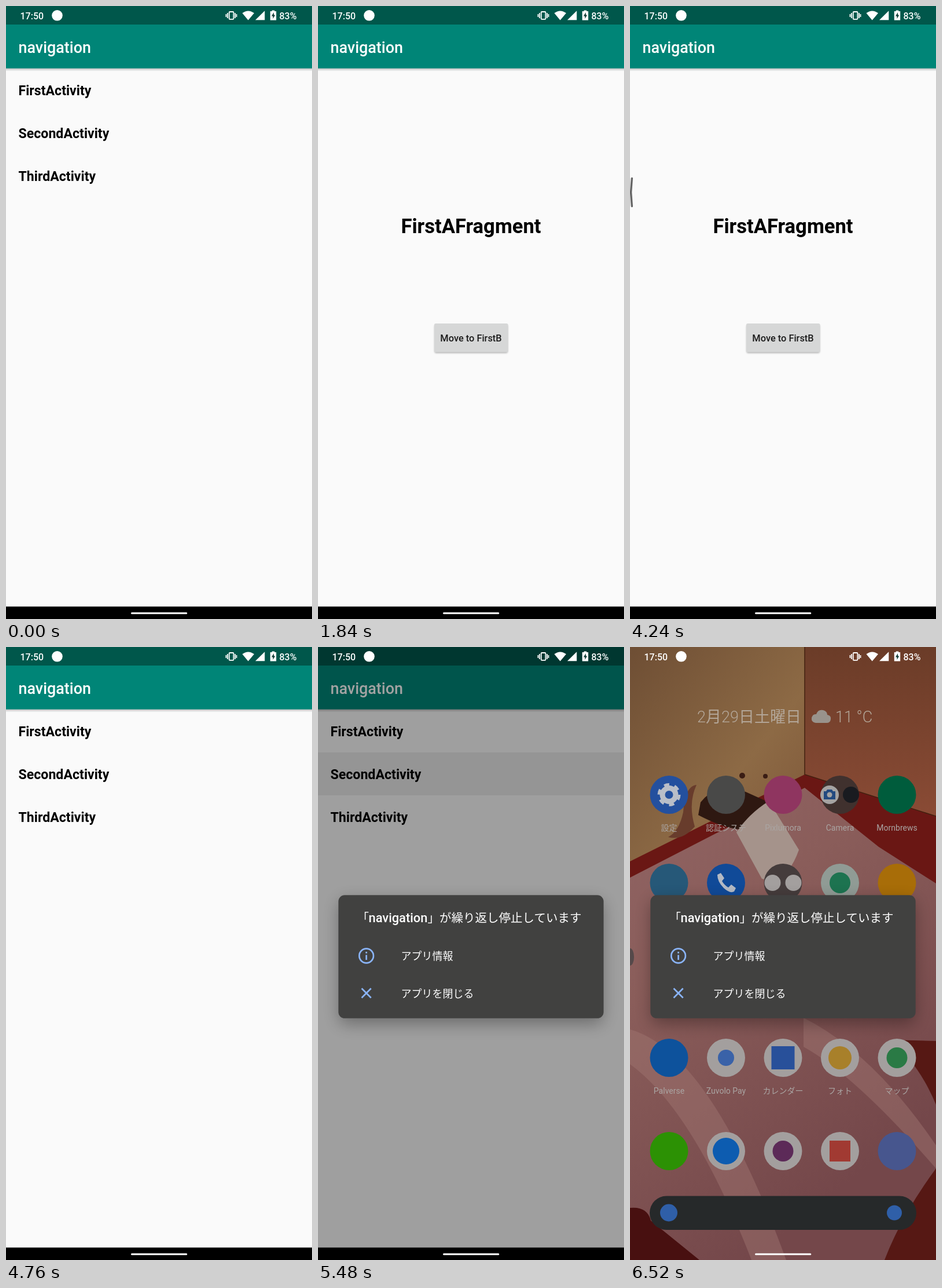
Animation, 529 px wide and 1058 px high, one loop 6.56 s. Source, as an HTML page:

```html
<!DOCTYPE html>
<html lang="ja">
<head>
<meta charset="utf-8">
<title>navigation</title>
<style>
html, body { margin: 0; width: 100%; height: 100%; overflow: hidden; background: #000; }
svg { display: block; width: 100vw; height: 100vh; font-family: Roboto, "Noto Sans CJK JP", sans-serif; }
.bar { font: 500 26.9px Roboto, sans-serif; fill: #fff; }
.row { font: 700 23.15px Roboto, sans-serif; }
.big { font: 700 34.6px Roboto, sans-serif; text-anchor: middle; }
.btn { font: 500 16.4px Roboto, sans-serif; text-anchor: middle; fill: #1b1b1b; }
.status { font: 500 16px Roboto, sans-serif; fill: #fff; }
.jp { font-family: "Noto Sans CJK JP", "Noto Sans CJK", sans-serif; fill: #fff; }
.label { font-size: 14px; text-anchor: middle; fill: #aaa5a3; }
.date { font-size: 27px; font-weight: 300; fill: #b3a698; }
</style>
</head>
<body>
<svg viewBox="0 0 529 1058" preserveAspectRatio="none">
  <defs>
    <linearGradient id="fall" x2="0" y2="1">
      <stop stop-opacity=".22"/><stop offset="1" stop-opacity="0"/>
    </linearGradient>
    <linearGradient id="wall" x2="1" y2="1">
      <stop stop-color="#6e4e34"/><stop offset=".6" stop-color="#8d6a45"/><stop offset="1" stop-color="#7d5538"/>
    </linearGradient>
    <linearGradient id="side" x2="0" y2="1">
      <stop stop-color="#6b3c28"/><stop offset="1" stop-color="#8c4c36"/>
    </linearGradient>
    <linearGradient id="bed" x2=".4" y2="1">
      <stop stop-color="#94686a"/><stop offset=".5" stop-color="#8a5d5a"/><stop offset="1" stop-color="#74474a"/>
    </linearGradient>
    <filter id="soft" x="-20%" y="-40%" width="140%" height="180%"><feGaussianBlur stdDeviation="14"/></filter>
    <filter id="tiny" x="-10%" y="-20%" width="120%" height="150%"><feGaussianBlur stdDeviation="1.5"/></filter>
    <clipPath id="clip0"><rect y="108" width="529" height="74"/></clipPath>
    <clipPath id="clip1"><rect y="182" width="529" height="74"/></clipPath>
    <clipPath id="clip2"><rect x="201" y="548" width="127.500" height="49.500" rx="2.700"/></clipPath>
    <g id="frame">
      <rect width="529" height="1058"/>
      <rect y="32" width="529" height="1004.500" fill="#fafafa"/>
      <rect width="529" height="32.300" fill="#00574b"/>
      <rect y="32" width="529" height="75.700" fill="#008577"/>
      <rect y="107.700" width="529" height="5" fill="url(#fall)"/>
      <text class="bar" x="21.500" y="80.800">navigation</text>
    </g>
  </defs>

  <g id="home">
    <rect width="529" height="1058" fill="url(#bed)"/>
    <path d="M0 0H302V222L0 372Z" fill="url(#wall)"/>
    <path d="M302 0H529V312L302 222Z" fill="url(#side)"/>
    <path d="M302 220L529 292V408L430 345L302 243L0 398V370Z" fill="#6a1714"/>
    <path d="M302 0V220L529 292" fill="none" stroke="#42200f" stroke-width="1.500"/>
    <path d="M529 680L450 678Q500 720 529 790ZM529 900Q470 980 440 1058H529Z" fill="#561814"/>
    <path d="M0 968Q30 965 36 990L120 1058H0Z" fill="#481010"/>
    <path d="M0 660Q140 700 270 1058H210Q110 800 0 720ZM300 640Q420 700 529 860V900Q390 740 300 690Z" fill="#a07672" opacity=".45"/>
    <path d="M122 268Q150 232 200 250L240 268Q215 300 190 315Q160 312 118 290Z" fill="#2e1811"/>
    <g fill="#3a1d14"><circle cx="194" cy="222" r="5"/><circle cx="234" cy="223" r="4"/><circle cx="197" cy="333" r="4"/></g>
    <path d="M66 328Q85 318 92 285Q95 240 115 238Q100 270 112 310Q90 335 66 328Z" fill="#683c2c"/>
    <path d="M240 266Q205 288 184 320L228 400Q270 412 292 350Z" fill="#a5938b"/>
    <ellipse cy="535" rx="7" ry="15" fill="#55494a"/>
    <g id="work"></g>
  </g>

  <g id="list">
    <use href="#frame"/>
    <g id="rip0" clip-path="url(#clip0)"><rect y="108" width="529" height="74"/><circle cx="264" cy="145"/></g>
    <g id="rip1" clip-path="url(#clip1)"><rect y="182" width="529" height="74"/><circle cx="264" cy="219"/></g>
    <text class="row" x="21.500" y="153.600">FirstActivity</text>
    <text class="row" x="21.500" y="227.700">SecondActivity</text>
    <text class="row" x="21.500" y="301.800">ThirdActivity</text>
    <rect id="dim" width="529" height="1058"/>
  </g>

  <g id="first">
    <use href="#frame"/>
    <text class="big" id="name" x="264.500" y="392"></text>
    <g id="button">
      <rect x="201.500" y="550" width="126.500" height="49" rx="3" opacity=".3" filter="url(#tiny)"/>
      <rect x="201" y="548" width="127.500" height="49.500" rx="2.700" fill="#d6d7d7"/>
      <g id="rip2" clip-path="url(#clip2)"><rect x="201" y="548" width="128" height="50"/><circle cx="264.500" cy="573"/></g>
      <text class="btn" x="264.500" y="578.800">Move to FirstB</text>
    </g>
  </g>

  <path id="arrow" fill="none" stroke="#666" stroke-width="3.400" stroke-linecap="round" stroke-linejoin="round"/>

  <g id="dialog">
    <rect x="37" y="438" width="455" height="212" rx="11" opacity=".32" filter="url(#soft)"/>
    <rect x="35.300" y="428.300" width="458.400" height="212.500" rx="10.800" fill="#414140"/>
    <g class="jp" font-size="20.500">
      <text x="67.500" y="474.500">「</text>
      <text x="87.600" y="474.500" font-size="21.800" font-weight="500" font-family="Roboto, sans-serif">navigation</text>
      <text x="189.500" y="474.500">」が繰り返し停止しています</text>
    </g>
    <g class="jp" font-size="18">
      <text x="143.500" y="540">アプリ情報</text>
      <text x="143.500" y="604.500">アプリを閉じる</text>
    </g>
    <g fill="none" stroke="#8ab4f8" stroke-width="2.700">
      <circle cx="83.600" cy="533" r="12.300"/>
      <path d="M83.600 531.500V540M83.600 526V528.800M75.500 589.300L91.700 605.500M91.700 589.300L75.500 605.500"/>
    </g>
  </g>

  <g fill="#fff">
    <text class="status" x="24.500" y="22.500">17:50</text>
    <circle cx="88.500" cy="16.300" r="9.300"/>
    <g fill="none" stroke="#fff" stroke-width="1.800">
      <rect x="385.800" y="10" width="7.600" height="12.800" rx="1"/>
      <path d="M383 12V21M380.500 14V19M396 12V21M398.500 14V19"/>
    </g>
    <path d="M408.500 12.300Q418.700 4.500 429 12.300L418.700 24.500ZM431 24.300L447.300 8.200V24.300Z"/>
    <path d="M459.700 7.500H464.300V9H467.200V24.500H456.800V9H459.700Z"/>
    <path d="M463 11L459 17.500H461.500V22L465.300 15.500H463Z" fill="#123c36"/>
    <text class="status" x="472.500" y="22.500">83%</text>
    <rect x="216" y="1046.500" width="97.300" height="3" rx="1.500"/>
  </g>
</svg>
<script>
const $ = id => document.getElementById(id);
const clamp = x => Math.min(1, Math.max(0, x));
const span = (t, a, b) => clamp((t - a) / (b - a));
const mix = (a, b, p) => a + (b - a) * p;
const LOOP = 6560, OPEN = 972, SWAP = 2070, BACK = 3600, CLOSE = 4365, LEAVE = 5880;

// Home screen icons: column, y, disc colour, inner shape, label
const PALE = '#a39f9e';
const dot = (color, r = 16, dx = 0) => `<circle cx="${dx}" r="${r}" fill="${color}"/>`;
const box = (color, w = 36) => `<rect x="${-w / 2}" y="${-w / 2}" width="${w}" height="${w}" fill="${color}"/>`;
const gear = `<g fill="none" stroke="#b9bec8"><circle r="11.500" stroke-width="9"/>
  <circle r="17.500" stroke-width="5" stroke-dasharray="9 9.326"/></g>`;
const phone = '<path d="M-15 -14L-9 -17L-3 -8L-7 -3Q-3 4 4 8L9 3L17 9L14 15Q7 19 -4 9Q-15 -2 -15 -14Z" fill="#b4bac4"/>';
const camera = dot('#a5a3a2', 16, -18) + dot('#191b20', 14, 19) +
  '<path d="M-28 -6H-24L-22 -9H-14L-12 -6H-8V8H-28Z" fill="#234a80"/>' + dot('#a5a3a2', 4.5, -18);
const icons = [
  [0, 255, '#24509e', gear, '設定'],
  [1, 255, '#494948', '', '認証システ'],
  [2, 255, '#8f3560', '', 'Pixlumora'],
  [3, 255, '#40312e', camera, 'Camera'],
  [4, 255, '#005c3c', '', 'Mornbrews'],
  [0, 407, '#265878', ''],
  [1, 407, '#104a98', phone],
  [2, 407, '#453c3c', dot(PALE, 14, -18) + dot(PALE, 14, 18)],
  [3, 407, '#909b95', dot('#1d7350', 18)],
  [4, 407, '#a86d08', ''],
  [0, 709, '#0d529c', '', 'Palverse'],
  [1, 709, PALE, dot('#3a62a8', 14), 'Zuvolo Pay'],
  [2, 709, PALE, box('#28509a', 40), 'カレンダー'],
  [3, 709, PALE, dot('#a8802a', 20), 'フォト'],
  [4, 709, PALE, dot('#2a7a45', 18), 'マップ'],
  [0, 870, '#2c9104', ''],
  [1, 870, PALE, dot('#0d5cb0', 23)],
  [2, 870, PALE, dot('#5c2a58', 18)],
  [3, 870, PALE, box('#a13a32')],
  [4, 870, '#47568e', '']
];
$('work').innerHTML = `
  <text class="date" x="116" y="129.500">2月29日土曜日</text>
  <path d="M321 131Q313 130 314 122Q316 115 322 116Q325 107 334 109Q341 111 341 117Q348 118 347 125Q346 131 340 131Z" fill="#99938c"/>
  <text class="date" x="355" y="129.500">11 °C</text>` +
  icons.map(([col, y, color, inner, label = '']) =>
    `<g transform="translate(${67.5 + 98.5 * col} ${y})">${dot(color, 33)}${inner}
     <text class="label" y="62">${label}</text></g>`).join('') + `
  <rect x="34" y="947.500" width="461" height="58.500" rx="29" fill="#26292a"/>
  <circle cx="67" cy="976.500" r="15" fill="#2f5fa8"/><circle cx="457" cy="976.500" r="13" fill="#2f5fa8"/>`;

// Fast start with a very long settle, made of two cubic pieces
const cubic = (a, b, c, d, u) => {
  const v = 1 - u;
  return v * v * v * a + 3 * v * v * u * b + 3 * v * u * u * c + u * u * u * d;
};
function settle(x) {
  const [xs, ys] = x < 1 / 6
    ? [[0, .05, .133333, 1 / 6], [0, 0, .06, .4]]
    : [[1 / 6, .208333, .25, 1], [.4, .82, 1, 1]];
  let lo = 0, hi = 1;
  for (let i = 0; i < 24; i++) {
    const m = (lo + hi) / 2;
    if (cubic(...xs, m) < x) lo = m; else hi = m;
  }
  return cubic(...ys, lo);
}

function place(id, scale, alpha, dy = 0) {
  const el = $(id);
  el.style.display = alpha > 0 ? '' : 'none';
  el.setAttribute('opacity', alpha);
  el.setAttribute('transform', `translate(264.5 ${529 + dy}) scale(${scale}) translate(-264.5 -529)`);
}

function ripple(id, t, press, release, size) {
  const [back, spot] = $(id).children, age = t - press;
  const out = 1 - span(t, release, release + 140);
  back.setAttribute('opacity', .06 * span(age, 0, 120) * out);
  spot.setAttribute('opacity', .064 * span(age, 0, 75) * out);
  spot.setAttribute('r', size * (1 - (1 - span(age, 0, 225)) ** 2));
}

function swipe(t) {
  const late = t > 4000, start = late ? 4225 : 3425, fire = late ? CLOSE : BACK;
  const pull = span(t, start, start + 130), cy = late ? 321.5 : 317;
  const angle = mix(90, 56, pull) * Math.PI / 180, x = mix(-1, 20, pull);
  const ex = x + 24.2 * Math.cos(angle), ey = 24.2 * Math.sin(angle);
  const on = t > start + 10 ? 1 - span(t, fire, fire + 120) : 0;
  $('arrow').setAttribute('d', `M${ex} ${cy - ey}L${x} ${cy}L${ex} ${cy + ey}`);
  $('arrow').setAttribute('opacity', on);
}

function draw(t) {
  const open = settle(span(t, OPEN, OPEN + 400));
  const close = settle(span(t, CLOSE, CLOSE + 400));
  const leave = 1 - (1 - span(t, LEAVE, LEAVE + 250)) ** 1.7;
  const back = t >= CLOSE;

  place('list', back ? mix(1.1, 1, close) : mix(1, 1.15, open),
    1 - span(t, LEAVE + 25, LEAVE + 150), 155 * leave);
  place('first', back ? mix(1, .9, close) : mix(.85, 1, open),
    span(t, OPEN + 50, OPEN + 100) * (1 - span(t, CLOSE + 35, CLOSE + 85)));

  const second = t >= SWAP && t < BACK;
  $('name').textContent = second ? 'FirstBFragment' : 'FirstAFragment';
  $('button').style.display = second ? 'none' : '';

  ripple('rip0', t, 710, 1100, 275);
  ripple('rip1', t, 5190, 5410, 275);
  ripple('rip2', t, 1838, 2100, 70);
  swipe(t);

  $('dim').setAttribute('opacity', .6 * span(t, 5360, 5560));
  $('dialog').setAttribute('opacity', span(t, 5320, 5470));

  const rise = 1 - (1 - span(t, LEAVE + 20, 6440)) ** 2.5;
  $('home').style.display = t > LEAVE ? '' : 'none';
  $('work').setAttribute('opacity', rise);
  $('work').setAttribute('transform', `translate(0 ${-40 * (1 - rise)})`);
}

const begin = performance.now();
function tick() {
  draw((performance.now() - begin) % LOOP);
  requestAnimationFrame(tick);
}
tick();
</script>
</body>
</html>
```
